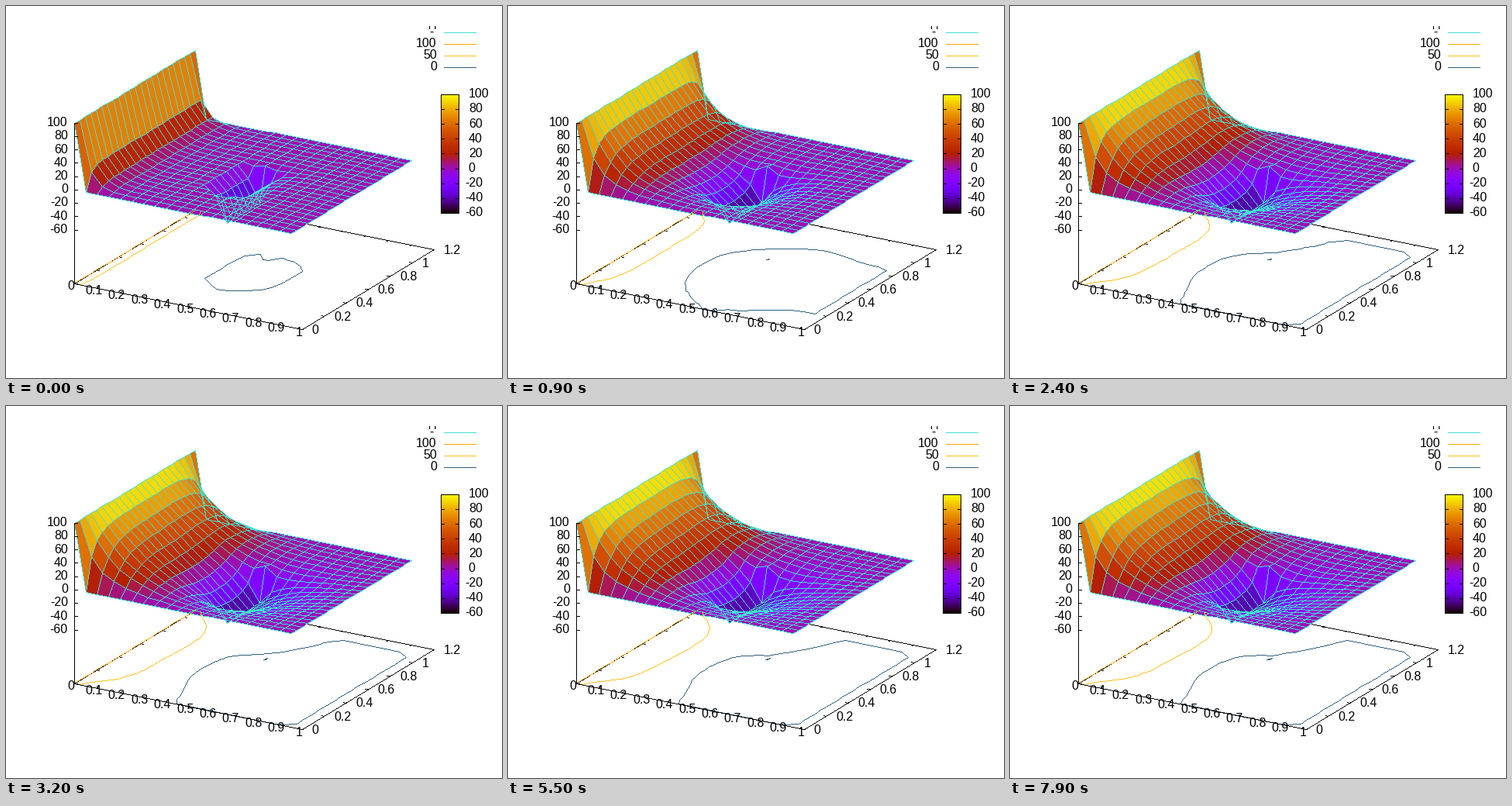
Recreate the animation shown at these times as a matplotlib script. Size 640x480 px, loop 8000 ms.

```python
import numpy as np
import matplotlib.pyplot as plt
from matplotlib.animation import FuncAnimation
from matplotlib.collections import PolyCollection
from matplotlib.colors import to_rgba

W, H, DPI = 640, 480, 100
FRAMES, INTERVAL = 80, 100
NX, NY, STEP = 20, 23, 0.05
BLACK, TURQUOISE, GOLD = "black", "#40e0d0", "#ffc020"
SLATE, ORANGE = "#306080", "#ffa500"

# Oblique projection: pixel vectors of the unit axes
ORIGIN = np.array([88.0, 357.5])
EX, EY = np.array([294.2, 59.3]), np.array([141.5, -85.6])
Z0, ZS = 236.9, 0.861


def base(x, y):
    """Pixel position on the floor of the box."""
    return ORIGIN + np.multiply.outer(x, EX) + np.multiply.outer(y, EY)


def palette(t):
    v = np.clip((np.asarray(t) + 60) / 160, 0, 1)
    return np.stack([np.sqrt(v), v ** 3,
                     np.clip(np.sin(2 * np.pi * v), 0, 1)], axis=-1)


def relax():
    """Gauss-Seidel sweeps: hot wall, cold rod, zero on the other edges."""
    t = np.ones((NX, NY))
    t[:, 0] = t[:, -1] = t[-1] = 0
    t[0] = 100
    t[10, 7:14] = -50
    fixed = {(10, j) for j in range(7, 15)}
    inner = [(i, j) for i in range(1, NX - 1) for j in range(1, NY - 1)
             if (i, j) not in fixed]
    history = []
    for _ in range(FRAMES):
        for i, j in inner:
            t[i, j] = (t[i - 1, j] + t[i + 1, j] + t[i, j - 1] + t[i, j + 1]) / 4
        history.append(t.copy())
    return history


def blank():
    return np.zeros((H, W, 4), np.uint8)


def stroke(img, pts, color):
    """Draw hard one-pixel polylines; pts has shape (..., n, 2)."""
    pts = np.rint(pts).astype(int)
    p = pts[..., :-1, :].reshape(-1, 2)
    d = pts[..., 1:, :].reshape(-1, 2) - p
    n = np.maximum(np.abs(d).max(axis=1), 1)
    f = np.minimum(np.arange(n.max() + 1) / n[:, None], 1)
    xy = np.floor(p[:, None] + d[:, None] * f[..., None] + 0.5).astype(int)
    img[xy[..., 1], xy[..., 0]] = np.multiply(to_rgba(color), 255)


fields = relax()
gx, gy = np.meshgrid(np.arange(NX) * STEP, np.arange(NY) * STEP, indexing="ij")
floor = base(gx, gy)

# Cells from far to near
cell_j, cell_i = [a.ravel() for a in np.meshgrid(
    np.arange(NY - 2, -1, -1), np.arange(NX - 1), indexing="ij")]

plt.rcParams["font.family"] = "Liberation Sans"
fig = plt.figure(figsize=(W / DPI, H / DPI), dpi=DPI, facecolor="white")
ax = fig.add_axes([0, 0, 1, 1])
ax.axis("off")
back, front = blank(), blank()


def label(x, y, text, ha):
    ax.text(x - 0.7, y + 4.8, text, fontsize=16 * 72 / DPI, ha=ha,
            va="baseline", zorder=8)


def tick(img, p, d):
    stroke(img, [p, np.add(p, d)], BLACK)


def draw_box():
    a, b, c, d = base(0, 0), base(1, 0), base(1, 1.2), base(0, 1.2)
    stroke(back, [c, d, a], BLACK)
    stroke(front, [c, b, a, (88, 151)], BLACK)
    ux, uy = EX / np.hypot(*EX) * 4, EY / np.hypot(*EY) * 2
    for k in range(11):
        tick(front, base(k / 10, 0), uy)
        tick(back, base(k / 10, 1.2), -uy)
        label(84.3 + 29.4 * k, 361 + 5.93 * k, f"{k / 10:g}", "center")
    for k in range(7):
        tick(back, base(0, k / 5), ux)
        tick(front, base(1, k / 5), -ux)
        label(395 + 28.3 * k, 417.5 - 17.15 * k, f"{k / 5:g}", "left")
    for v in range(-60, 101, 20):
        y = Z0 - ZS * v
        tick(front, (88, y), (4, 0))
        label(80, y - 1, f"{v}", "right")


def draw_colorbar():
    left, right, top, bottom = 561, 584, 114, 267
    ramp = palette(np.linspace(100, -60, bottom - top))[:, None, :]
    ax.imshow(ramp, extent=(left, right, bottom, top), aspect="auto",
              interpolation="nearest", zorder=2)
    stroke(front, [(left, top), (right, top), (right, bottom),
                   (left, bottom), (left, top)], BLACK)
    for v in range(-60, 101, 20):
        y = bottom - (v + 60) * (bottom - top) / 160
        tick(front, (left, y), (4, 0))
        tick(front, (right, y), (-4, 0))
        label(592.5 if v < 0 else 597, y - 1, f"{v}", "left")


def draw_key():
    rows = [("'-'", TURQUOISE), ("100", ORANGE), ("50", GOLD), ("0", SLATE)]
    for k, (text, color) in enumerate(rows):
        y = 34 + 15 * k
        label(556, y - 1, text, "right")
        stroke(front, [(565, y), (606, y)], color)


def layer(img, zorder):
    return ax.imshow(img, extent=(-0.5, W - 0.5, H - 0.5, -0.5), aspect="auto",
                     interpolation="nearest", zorder=zorder)


draw_box()
draw_colorbar()
draw_key()
layer(back, 1)
lines = layer(front, 4)
cells = PolyCollection([], edgecolors="none", linewidths=0, zorder=3)
ax.add_collection(cells, autolim=False)
ax.set_xlim(-0.5, W - 0.5)
ax.set_ylim(H - 0.5, -0.5)
on_top = front[..., 3] > 0


def draw_contours(img, t):
    # Levels just below the values held at the edges, so edges count as above
    cs = ax.contour(floor[..., 0], floor[..., 1], t, levels=[-1e-6, 50, 99.999])
    for segs, color in zip(cs.allsegs, (SLATE, GOLD, ORANGE)):
        for seg in segs:
            if len(seg) > 1:
                stroke(img, seg, color)
    cs.remove()


def draw(n):
    t = fields[n]
    pts = np.rint(np.stack(
        [floor[..., 0], floor[..., 1] - ORIGIN[1] + Z0 - ZS * t], axis=-1))
    i, j = cell_i, cell_j
    ring = [(i, j), (i + 1, j), (i + 1, j + 1), (i, j + 1)]
    cells.set_verts(np.stack([pts[r] for r in ring], axis=1))
    cells.set_facecolor(palette(sum(t[r] for r in ring) / 4))

    img = blank()
    stroke(img, pts, TURQUOISE)
    stroke(img, pts.transpose(1, 0, 2), TURQUOISE)
    draw_contours(img, t)
    img[on_top] = front[on_top]
    lines.set_data(img)
    return cells, lines


anim = FuncAnimation(fig, draw, frames=FRAMES, interval=INTERVAL,
                     repeat=True, repeat_delay=0, blit=False)
plt.show()
```
